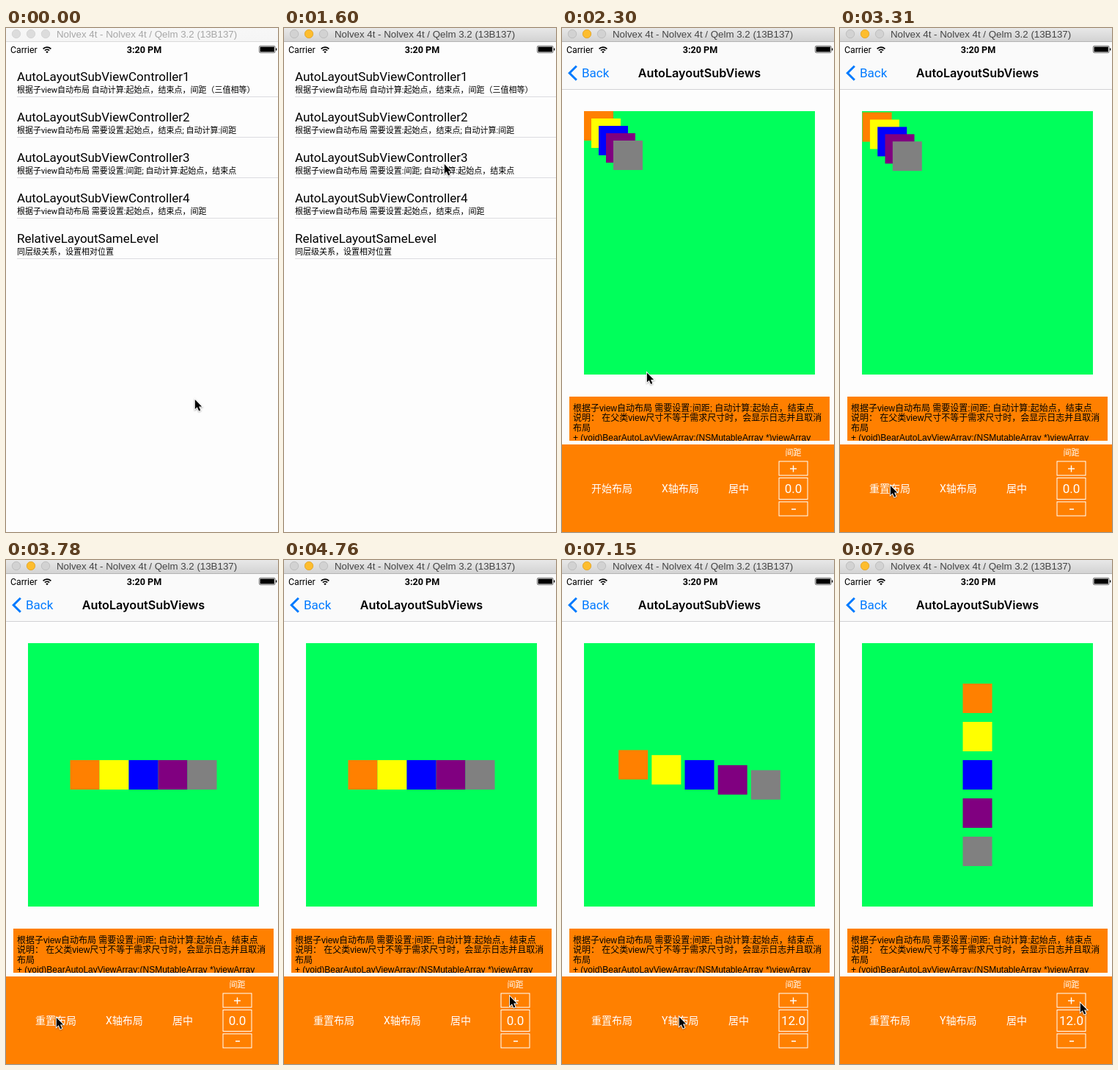
An HTML page with a canvas that plays this animation: 371 px wide and 685 px high, repeating every 7.99 s.

```html
<!DOCTYPE html>
<html lang="zh-CN">
<head>
<meta charset="utf-8">
<title>Auto layout demo</title>
<style>
html, body { margin: 0; width: 100%; height: 100%; overflow: hidden; background: #fdfdfd; }
canvas { display: block; width: 371px; height: 685px; }
</style>
</head>
<body>
<canvas id="stage"></canvas>
<script>
const W = 371, H = 685, LOOP = 7990, VIEW = 375;
const canvas = document.getElementById('stage');
const dpr = window.devicePixelRatio || 1;
canvas.width = W * dpr;
canvas.height = H * dpr;
const c = canvas.getContext('2d');

const CJK = '"Noto Sans CJK SC", "Noto Sans CJK", sans-serif';
const UI = 'Roboto, ' + CJK;
const HELV = '"Liberation Sans", ' + CJK;
const ORANGE = '#ff8000', PAGE = '#fdfdfd';
const COLORS = [ORANGE, '#ffff00', '#0000ff', '#800080', '#808080'];
const PREFIX = '根据子view自动布局 ';
const ROWS = [
  ['AutoLayoutSubViewController1', PREFIX + '自动计算:起始点，结束点，间距（三值相等）'],
  ['AutoLayoutSubViewController2', PREFIX + '需要设置:起始点，结束点; 自动计算:间距'],
  ['AutoLayoutSubViewController3', PREFIX + '需要设置:间距; 自动计算:起始点，结束点'],
  ['AutoLayoutSubViewController4', PREFIX + '需要设置:起始点，结束点，间距'],
  ['RelativeLayoutSameLevel', '同层级关系，设置相对位置']
];
const NOTES = [
  ROWS[2][1],
  '说明： 在父类view尺寸不等于需求尺寸时，会显示日志并且取消',
  '布局',
  '+ (void)BearAutoLayViewArray:(NSMutableArray *)viewArray'
];

// Event times in ms
const ACTIVATE = 1600, PUSH = 1620, LAYOUT_X = 3275, LAYOUT_Y = 7025;
const GAP = { start: 5050, every: 47, count: 24, step: 0.5, ease: 340 };
const LAYOUT_MS = 500, FIRST_DRAW = 35;

// Pointer stops: time, x, y
const POINTER = [
  [390, 257, 504], [880, 202, 130], [1120, 218, 184], [1890, 218, 184],
  [2390, 108, 487], [2480, 108, 544], [2630, 108, 544], [2930, 64, 617],
  [3080, 68, 621], [4080, 68, 621], [4250, 172, 600], [4430, 172, 600],
  [4780, 308, 592], [6230, 308, 592], [6540, 150, 631], [6710, 150, 631],
  [6820, 159, 620], [7230, 159, 620], [7560, 346, 607], [7790, 346, 607],
  [7960, 327, 601]
];

const clamp = v => Math.max(0, Math.min(1, v));
const mix = (a, b, p) => a + (b - a) * p;

// cubic-bezier(.42, 0, .58, 1)
function ease(t) {
  t = clamp(t);
  let lo = 0, hi = 1, s = t;
  for (let i = 0; i < 18; i++) {
    s = (lo + hi) / 2;
    const x = 1.26 * s * (1 - s) * (1 - s) + 1.74 * s * s * (1 - s) + s * s * s;
    if (x < t) lo = s; else hi = s;
  }
  return s * s * (3 - 2 * s);
}

function pushProgress(t) {
  const k = Math.max(0, t - PUSH) * 0.0176;
  return t > PUSH + 520 ? 1 : 1 - (1 + k) * Math.exp(-k);
}

function rect(x, y, w, h, fill) {
  c.fillStyle = fill;
  c.fillRect(x, y, w, h);
}

function text(str, x, y, size, fill, { font = UI, weight = 400, align = 'left' } = {}) {
  c.font = `${weight} ${size}px ${font}`;
  c.textAlign = align;
  c.fillStyle = fill;
  c.fillText(str, x, y);
}

function drawTitleBar(active) {
  const g = c.createLinearGradient(0, 0, 0, 18);
  g.addColorStop(0, active ? '#e8e8e8' : '#f7f7f7');
  g.addColorStop(1, active ? '#d3d3d3' : '#f5f5f5');
  rect(0, 0, W, 19, g);
  rect(0, 18, W, 1, active ? '#b4b4b4' : '#dadada');
  [14, 34, 54].forEach((x, i) => {
    const lit = active && i === 1;
    c.beginPath();
    c.arc(x, 8, 5.7, 0, 7);
    c.fillStyle = lit ? '#fdbd2e' : active ? '#d2d2d2' : '#dcdcdc';
    c.fill();
    c.lineWidth = 0.8;
    c.strokeStyle = lit ? '#dfa023' : active ? '#b8b8b8' : '#d0d0d0';
    c.stroke();
  });
  text('Nolvex 4t - Nolvex 4t / Qelm 3.2 (13B137)', 69, 13, 13.3,
    active ? '#444' : '#a6a6a6', { font: HELV });
}

function drawStatus() {
  text('Carrier', 6, 34, 12.3, '#000');
  text('3:20 PM', 188.5, 34, 12.6, '#000', { weight: 700, align: 'center' });
  c.strokeStyle = '#000';
  c.lineWidth = 1.7;
  for (const r of [4.2, 7.4]) {
    c.beginPath();
    c.arc(56, 33.5, r, -Math.PI * 0.76, -Math.PI * 0.24);
    c.stroke();
  }
  c.beginPath();
  c.moveTo(56, 34.3);
  c.arc(56, 34, 2.3, -Math.PI * 0.76, -Math.PI * 0.24);
  c.fillStyle = '#000';
  c.fill();
  c.lineWidth = 0.5;
  c.beginPath();
  c.roundRect(345.25, 24.25, 22, 9.5, 2);
  c.stroke();
  rect(346.5, 25.5, 19.5, 7, '#000');
  rect(368, 27.5, 1.3, 3, '#000');
}

function drawNav() {
  rect(0, 19, W, 64, '#fafafa');
  rect(0, 83, W, 1, '#d2d2d4');
  c.beginPath();
  c.moveTo(19.8, 51.8);
  c.lineTo(10.2, 61.3);
  c.lineTo(19.8, 70.8);
  c.lineWidth = 3;
  c.strokeStyle = '#007aff';
  c.stroke();
  text('Back', 27, 67, 17, '#007aff');
  text('AutoLayoutSubViews', 187.5, 67, 16.2, '#000',
    { font: 'Inter, sans-serif', weight: 600, align: 'center' });
}

function drawList(p) {
  c.save();
  c.translate(-0.3 * VIEW * p, 0);
  ROWS.forEach(([title, sub], i) => {
    const y = 55 * i;
    text(title, 15, y + 72, 17, '#000');
    text(sub, 15, y + 88, 11, '#000');
    rect(15, y + 93, VIEW, 1, '#dcdce0');
  });
  c.restore();
  if (p > 0) rect(0, 19, W, H, `rgba(0,0,0,${0.1 * p})`);
}

function pitchAt(t) {
  let gap = 0;
  for (let k = 0; k < GAP.count; k++) {
    gap += GAP.step * ease((t - GAP.start - k * GAP.every) / GAP.ease);
  }
  return 40 + gap;
}

function drawSquares(t) {
  const first = t < LAYOUT_X + FIRST_DRAW ? 0 : ease((t - LAYOUT_X) / LAYOUT_MS);
  const turn = t < LAYOUT_Y + FIRST_DRAW ? 0 : ease((t - LAYOUT_Y) / LAYOUT_MS);
  const pitch = pitchAt(t);
  COLORS.forEach((color, i) => {
    const off = (i - 2) * pitch;
    const x = mix(30 + 10 * i, 167.5 + off * (1 - turn), first);
    const y = mix(113 + 10 * i, 272 + off * turn, first);
    rect(x, y, 40, 40, color);
  });
}

function drawNotes() {
  rect(10, 501, 355, 60, ORANGE);
  c.save();
  c.beginPath();
  c.rect(10, 501, 355, 60);
  c.clip();
  NOTES.forEach((line, i) => text(line, 15, 520.5 + 13.6 * i, 12, '#000', { font: HELV }));
  c.restore();
}

function drawControls(t) {
  rect(0, 566, VIEW, 119, ORANGE);
  const white = '#fff', mid = { align: 'center' };
  text(t < LAYOUT_X + FIRST_DRAW ? '开始布局' : '重置布局', 40, 631, 14, white);
  text((t < LAYOUT_Y + FIRST_DRAW ? 'X' : 'Y') + '轴布局', 136, 631, 14, white);
  text('居中', 227, 631, 14, white);
  text('间距', 315.5, 581, 11, white, mid);
  c.strokeStyle = white;
  c.lineWidth = 1;
  for (const [y, h] of [[588.5, 20], [611, 30], [643.5, 20]]) {
    c.strokeRect(296, y + 0.5, 39, h - 1);
  }
  const taps = Math.max(0, Math.min(GAP.count, Math.floor((t - GAP.start) / GAP.every) + 1));
  text((taps * GAP.step).toFixed(1), 315.5, 632, 17, white, mid);
  rect(311, 598.3, 9, 1.4, white);
  rect(314.8, 594.5, 1.4, 9, white);
  rect(313, 653.3, 6, 1.5, white);
}

function drawDetail(t, p) {
  c.save();
  c.translate(Math.round(VIEW * (1 - p)), 0);
  rect(0, 83, VIEW, H - 83, PAGE);
  rect(30, 113, 315, 358, '#00ff5b');
  drawSquares(t);
  drawNotes();
  drawControls(t);
  c.restore();
}

function drawPointer(t) {
  let i = 0;
  while (i < POINTER.length - 1 && t >= POINTER[i + 1][0]) i++;
  const a = POINTER[i], b = POINTER[i + 1] || a;
  const p = b === a ? 0 : ease((t - a[0]) / (b[0] - a[0]));
  c.save();
  c.translate(mix(a[1], b[1], p) + 0.8, mix(a[2], b[2], p) + 1);
  c.scale(0.95, 0.95);
  c.beginPath();
  [[0, 0], [0, 13.6], [3.1, 10.7], [5.6, 16.3], [7.9, 15.3], [5.5, 9.9], [9.8, 9.9]]
    .forEach(([x, y]) => c.lineTo(x, y));
  c.closePath();
  c.shadowColor = 'rgba(0,0,0,0.35)';
  c.shadowBlur = 2 * dpr;
  c.shadowOffsetY = 0.8 * dpr;
  c.lineWidth = 2;
  c.strokeStyle = '#fff';
  c.stroke();
  c.shadowColor = 'transparent';
  c.fillStyle = '#000';
  c.fill();
  c.restore();
}

function draw(t) {
  c.setTransform(dpr, 0, 0, dpr, 0, 0);
  rect(0, 0, W, H, PAGE);
  const p = pushProgress(t);
  if (p < 1) drawList(p);
  if (t >= PUSH) {
    drawDetail(t, p);
    drawNav();
  }
  drawStatus();
  drawTitleBar(t >= ACTIVATE);
  drawPointer(t);
}

const begin = performance.now();
function tick() {
  draw((performance.now() - begin) % LOOP);
  requestAnimationFrame(tick);
}
tick();
</script>
</body>
</html>
```
